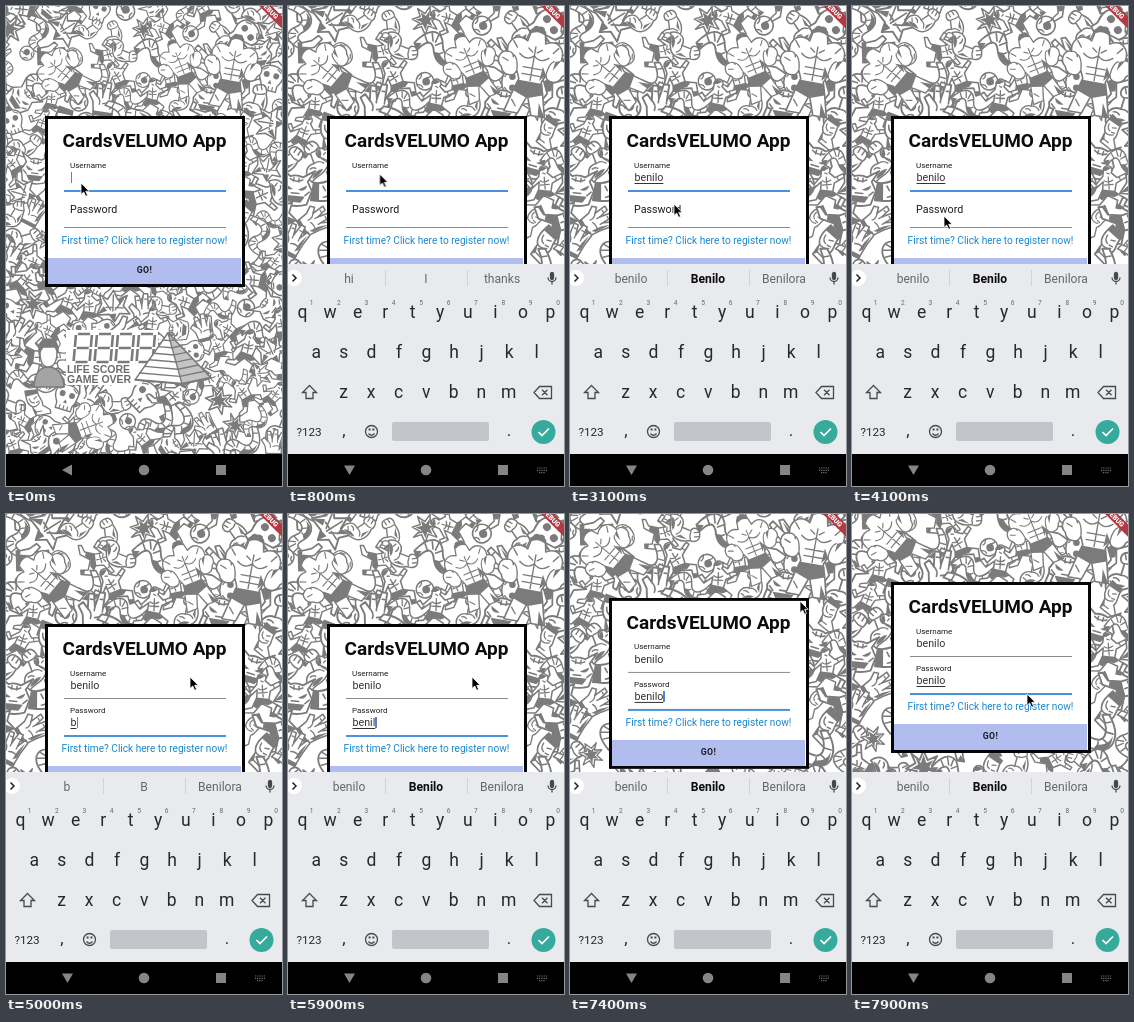
Animation of 276 by 480 pixels, one loop 8000 ms. Source, as an HTML page:

```html
<!DOCTYPE html>
<html lang="en">
<head>
<meta charset="utf-8">
<title>Login</title>
<style>
html, body { margin: 0; width: 100%; height: 100%; overflow: hidden; background: #fff; }
body { position: relative; font-family: Roboto, Arial, sans-serif; color: #1d1d1d; }
#stage, #page, #art, #banner, #keys, #nav, #mouse { position: absolute; left: 0; top: 0; }
#stage { width: 276px; height: 480px; overflow: hidden; background: #fff; }
#page { width: 276px; height: 480px; animation: scroll 8s linear infinite; }
#art { overflow: visible; transform-origin: 138px 68px; animation: cover 8s step-end infinite; }
#page div { position: absolute; white-space: pre; line-height: 14px; }
#page .card { box-sizing: border-box; left: 39px; top: 110px; width: 199.5px; height: 171px; border: 3px solid #060608; background: #fff; }
#page .title { left: 39px; width: 199px; top: 123px; font: 700 19px/24px Roboto, Arial, sans-serif; color: #0c0c0e; text-align: center; }
#page .label { left: 64px; font-size: 10.7px; transform-origin: 0 0; }
#page .user { top: 154px; transform: scale(.75); }
#page .pass { top: 196.7px; animation: float 8s ease-out infinite; }
#page .field { left: 64.5px; font-size: 10.7px; color: #333; }
.field span { text-underline-offset: 1.5px; text-decoration-skip-ink: none; }
.focus span { text-decoration: underline 1px; }
.field i { display: inline-block; width: 1.3px; height: 11px; margin-right: -2px; vertical-align: -2px; background: #4a86d8; visibility: hidden; }
#page .line { left: 58px; width: 162px; height: 1px; background: #8b8b8b; }
#page .line.focus { height: 2px; background: #4792da; }
#page .link { left: 39px; width: 199px; top: 228px; font-size: 10.1px; text-align: center; color: #1b87cf; }
#page .go { left: 42px; width: 193px; top: 252px; height: 26px; background: #b0bdee; font-weight: 700; font-size: 8.7px; line-height: 25px; letter-spacing: .4px; text-align: center; }
#keys { top: 258px; animation: rise 8s ease-out infinite; }
#keys text { text-anchor: middle; fill: #26282b; }
#keys .soft { fill: #63676c; }
#keys .bold { fill: #0c0c0e; font-weight: 700; }
#nav { top: 448px; }
#mouse { overflow: visible; animation: mouse 8s linear infinite; }
@keyframes cover { 0% { transform: none; } 2.5%, 100% { transform: scale(1.2); } }
@keyframes rise { 0%, 1.25% { transform: translateY(191px); } 5.6%, 100% { transform: none; } }
@keyframes float { 0%, 53.75% { transform: none; } 56.25%, 100% { transform: translateY(-5.5px) scale(.75); } }
@keyframes scroll {
  0%, 88.1% { transform: none; }
  88.75% { transform: translateY(-2px); }
  95%, 100% { transform: translateY(-42px); }
}
@keyframes mouse {
  0%, 7.5% { transform: translate(75px, 177px); }
  17.5%, 18.75% { transform: translate(141px, 141px); }
  24% { transform: translate(150px, 130px); }
  31% { transform: translate(150px, 132px); }
  38.75% { transform: translate(104px, 198px); }
  41.25%, 55% { transform: translate(92px, 210px); }
  61%, 75% { transform: translate(184px, 163px); }
  84%, 87.5% { transform: translate(231px, 117px); }
  88.75% { transform: translate(230px, 110px); }
  95% { transform: translate(230px, 72px); }
  98.5%, 100% { transform: translate(175px, 180px); }
}
</style>
</head>
<body>
<div id="stage">
  <div id="page">
    <svg id="art" width="276" height="448" fill="#fff" stroke="#7b7b7b" stroke-width="1.4" stroke-linejoin="round" stroke-linecap="round"></svg>
    <div class="card"></div>
    <div class="title">CardsVELUMO App</div>
    <div class="label user">Username</div>
    <div class="field" id="user" style="top:165.3px"><span></span><i></i></div>
    <div class="line" id="userLine" style="top:184px"></div>
    <div class="label pass">Password</div>
    <div class="field" id="pass" style="top:202px"><span></span><i></i></div>
    <div class="line" id="passLine" style="top:221px"></div>
    <div class="link">First time? Click here to register now!</div>
    <div class="go">GO!</div>
  </div>
  <svg id="banner" width="276" height="40">
    <g transform="translate(263.5 4) rotate(45)">
      <path d="M-40-4.5H40V4.5H-40Z" fill="#b23a42"/>
      <text y="2.4" font-size="6.8" font-weight="900" fill="#fff" text-anchor="middle">DEBUG</text>
    </g>
  </svg>
  <svg id="keys" width="276" height="190">
    <path d="M0 0H276V190H0Z" fill="#e8eaee"/>
    <path d="M97.5 6V22M179.5 6V22" stroke="#cfd2d6"/>
    <circle cx="6" cy="14" r="8" fill="#fff"/>
    <path d="M4.5 10.5L8 14L4.5 17.5" fill="none" stroke="#222" stroke-width="1.5"/>
    <g fill="none" stroke="#46494d" stroke-width="1.3">
      <rect x="262.5" y="8.5" width="3" height="7" rx="1.5" fill="#46494d"/>
      <path d="M260 13.5a4 4 0 0 0 8 0M264 17.5V20.5"/>
      <path d="M21.5 121.5L28.5 128.5H25V134.500H18V128.5H14.500Z"/>
      <path d="M251.5 122.5H263.5V134.500H251.5L246 128.5ZM254 125.7L259.5 131.200M259.5 125.7L254 131.200"/>
      <circle cx="83.5" cy="167.5" r="6"/>
      <path d="M80.5 169.5q3 3.5 6 0"/>
    </g>
    <path d="M80.6 165.5h2M84.4 165.5h2" stroke="#46494d" stroke-width="1.8"/>
    <rect x="104" y="158" width="97" height="19" rx="2" fill="#c2c5c9"/>
    <circle cx="255.5" cy="168" r="12" fill="#36aa9b"/>
    <path d="M250.5 168L254 171.5L261 164.5" fill="none" stroke="#fff" stroke-width="1.7"/>
  </svg>
  <svg id="nav" width="276" height="32">
    <path d="M0 0H276V32H0Z" fill="#000"/>
    <g fill="#858585">
      <path id="back" d="M56 16L66 10.5V21.5Z"/>
      <circle cx="138" cy="16" r="5.3"/>
      <path d="M210 11H220V21H210Z"/>
    </g>
    <path id="imeIcon" d="M249 14H259M249 16.3H259M251 18.6H257" stroke="#707070" stroke-width="1.2" stroke-dasharray="1.2 1"/>
  </svg>
  <svg id="mouse" width="10" height="15"><path d="M0 0V11.5L2.7 9L4.7 13.3L6.6 12.4L4.7 8.3H8.2Z" fill="#000" stroke="#fff" stroke-width=".8"/></svg>
</div>
<script>
const $ = id => document.getElementById(id);
const NS = 'http://www.w3.org/2000/svg';
const INK = '#7b7b7b';

function add(parent, tag, attrs, text) {
  const el = document.createElementNS(NS, tag);
  for (const k in attrs) el.setAttribute(k, attrs[k]);
  if (text) el.textContent = text;
  return parent.appendChild(el);
}

// Doodles: [white outline, dark patches, inner lines]
const skull = ['M-12-3C-12-16 12-16 12-3C12 4 8 5 8 8V13H-8V8C-8 5-12 4-12-3Z',
  'M-8-3a3 3 0 1 0 6 0a3 3 0 1 0-6 0M2-3a3 3 0 1 0 6 0a3 3 0 1 0-6 0M0 2l2 4h-4Z', 'M-4 9v4M0 9v4M4 9v4M-9-7l4-3M9-7l-4-3'];
const eye = ['M-8 0a8 8 0 1 0 16 0a8 8 0 1 0-16 0Z',
  'M-3-1a3.5 3.5 0 1 0 7 0a3.5 3.5 0 1 0-7 0', 'M-8 2q4 0 5 3M-4-6q2 1 1 4M2 7q0-3 3-4'];
const arm = ['M-15 12C-16 2-8-2-2 2L2-6C-2-8 0-15 6-14C13-14 13-8 11-4C12 4 8 13 0 13C-6 14-10 10-15 12Z',
  'M-13 10Q-6 6 0 11Q-6 13-13 10M10-2L6 9L5 4Z', 'M-2 2Q3 3 4 8M3-6Q7-4 10-5M4-13v4M8-13v4M-8 3q3 0 4 3M-11 5l2 3'];
const demon = ['M-11 13L-13 2L-9-5L-14-14L-5-8Q0-10 5-8L14-14L9-5L13 2L10 13Q0 17-11 13Z',
  'M-9-2l7 4q-6 2-7-4M9-2l-7 4q6 2 7-4M-8 7H8L5 12H-5Z', 'M-3 5h6M-5-6q5 3 10 0M-11 3l3 3M11 3l-3 3M-2-7v3M2-7v3'];
const tail = ['M-20 6C-14-12-4-10 0-1C4 7 12 6 16-10L20-7C18 12 4 18-4 6C-8-1-12-1-16 10Z',
  'M-20 6L-16 10L-15 4ZM-4 6Q4 17 13 7Q6 11 0 5Z', 'M-15-2l4 4M-11-6l3 5M-6-7l0 6M-1-3l-4 4M2 4l-4 4M6 5l1 6M11 2l3 4M14-4l4 2'];
const runner = ['M-3-17a4 4 0 1 1 7 2L9-10L17-13L18-10L8-5L6 3L14 9L10 19L6 18L8 11L-1 6L-9 14L-18 13L-17 10L-10 9L-5 0L-4-7L-12-1L-17-7L-14-9L-11-5L-4-12Z',
  'M-5 0L6 2L10 6L5 8L-1 6L-6 10L-9 8ZM-4-17a4.500 4.500 0 0 1 8-2l-4 2ZM10 19L6 18L7 14L11 16Z', 'M-3-8q4 3 8 0M-3-4h8M1-11V0M-10-4l-2 2M11-10l1 2M0-15l2 1'];
const hand = ['M-8 14L-10 3L-14-3L-11-6L-7-2L-8-13H-4L-2-4L0-15H4L4-4L8-12L11-10L9 1L8 14Z',
  'M-9 11H9V15H-9ZM9-9L8 6L5 9L6 0Z', 'M-7-2q4 3 3 7M-2-4v3M4-4v3M-1 4q4-2 8 0M-6-9h2M1-10h2'];
const boot = ['M-9-14L4-13C3-4 9-2 7 4L14 10V14H-2L-4 4C-10 0-9-8-9-14Z',
  'M-9-14L4-13L4-9L-9-8ZM-2 14L-4 4L0 10Z', 'M-4 4q5 1 8-3M0 10h5M-6-5q1 5 5 5M2-6l-3 2M4-1l-3 1'];
const burst = ['M0-12L3-5L10-8L6-1L13 3L5 4L6 12L0 6L-7 11L-5 3L-13 1L-6-3L-9-10L-3-5Z',
  'M0-9L2-3L7-5L4 0L9 3L3 3L3 8L0 4L-5 7L-3 2L-9 1L-4-2L-6-7L-2-3Z', ''];
const frill = ['M-14 8L-10-2L-12-10L-5-6L0-14L4-6L12-10L9-1L15 6L6 6L2 13L-3 7Z',
  'M-14 8L-8 0L-5 4ZM4-6L9-8L6-1ZM-3 7L2 13L3 6Z', 'M0-10V4M-9-7L-2 3M9-7L2 3M-6 1h5M2 1h7'];
const doodles = [runner, tail, arm, runner, hand, frill, boot, demon, runner, tail, burst, eye, arm, skull];
const hero = [
  'M-8-26C-18-32-26-24-24-14C-31-14-33-4-27 0C-25 8-14 8-13 1L-10 8L-13 18L-18 38H-6L0 21L6 38H18L13 18L10 8L13 1C14 8 25 8 27 0C33-4 31-14 24-14C26-24 18-32 8-26L6-36Q0-42-6-36Z',
  'M-11 9H11L13 19L2 23L-2 23L-13 19ZM-6-33Q-6-42 0-40Q6-42 6-33Q0-37-6-33ZM13 1L8 7L9-6ZM24-14L18-4L19-12ZM18 38L11 26L12 38Z',
  'M0-22V8M-13 0Q-14-10-18-12M13 0Q14-10 18-12M-13-14Q-6-8 0-14Q6-8 13-14M-8-3H8M-8 3H8M-24-14Q-19-15-18-10M-13 27l4 5M-20-24l4 5M20-24l-4 5M-27-8l5 2M-6-20l4 3M6-20l-4 3'
];

function stamp([shape, dark, lines], x, y, size, turn) {
  const g = add($('art'), 'g', { transform: `translate(${x} ${y}) rotate(${turn}) scale(${size})` });
  add(g, 'path', { d: shape });
  add(g, 'path', { d: dark, fill: INK, stroke: 'none' });
  add(g, 'path', { d: lines, fill: 'none', 'stroke-width': 1.2 });
}

function drawArt() {
  let seed = 41;
  const rnd = () => (seed = (seed * 16807) % 2147483647) / 2147483647;
  for (let y = -20, row = 0; y < 470; y += 23, row++)
    for (let x = row % 2 ? -8 : 5; x < 292; x += 26)
      stamp(doodles[Math.floor(rnd() * doodles.length)], x + rnd() * 8 - 4, y + rnd() * 8 - 4, .8 + rnd() * .35, rnd() * 180 - 90);
  stamp(hero, 226, 66, .95, 10);
  stamp(hero, 176, 62, .75, -22);
  stamp(hero, 58, 68, .8, -50);
  stamp(hero, 80, 422, .8, 70);

  const art = $('art');
  add(art, 'path', { d: 'M60 324H152V366L131 379H60Z', stroke: 'none' });
  const seg = 'M2 0H14M0 1V13M16 1V13M2 14H14M0 15V27M16 15V27M2 28H14';
  for (let i = 0; i < 4; i++)
    add(art, 'path', { d: seg, transform: `translate(${70 + i * 21} 328) skewX(-5)`, 'stroke-width': 2.6, 'stroke-linecap': 'butt' });
  const label = { x: 61, fill: '#6c6c6c', stroke: 'none', 'font-family': 'Liberation Sans, Arial, sans-serif', 'font-size': 10.5, 'font-weight': 700 };
  add(art, 'text', { ...label, y: 367 }, 'LIFE SCORE');
  add(art, 'text', { ...label, y: 377 }, 'GAME OVER');
  add(art, 'path', { d: 'M129 374L162 327L205 372L176 378Z' });
  add(art, 'path', { d: 'M162 327L205 372L176 378Z', fill: '#c4c4c4' });
  for (let k = .15; k < 1; k += .14)
    add(art, 'path', { d: `M${162 - 33 * k} ${327 + 47 * k}L${162 + 14 * k} ${327 + 51 * k}L${162 + 43 * k} ${327 + 45 * k}`, fill: 'none' });
  add(art, 'path', { d: 'M28 381Q29 361 42 361Q56 361 58 381Z', fill: '#a4a4a4' });
  add(art, 'path', { d: 'M34 345Q34 335 42 335Q51 335 51 345Q51 361 42 361Q34 361 34 345Z' });
  add(art, 'path', { d: 'M33 347Q32 333 42 333Q53 333 52 347L49 341H37Z', fill: INK });
}

const key = (x, y, size, s, cls = '') => add($('keys'), 'text', { x, y, 'font-size': size, class: cls }, s);

function drawKeys() {
  [['qwertyuiop', 14.5, 53.5], ['asdfghjkl', 28.3, 93.5], ['zxcvbnm', 55.5, 133.5]].forEach(([row, x, y]) =>
    [...row].forEach((c, i) => key(x + i * 27.55, y, 17.5, c)));
  [...'1234567890'].forEach((c, i) => key(23.5 + i * 27.4, 40.5, 6.6, c, 'soft'));
  key(21, 171.5, 11.7, '?123');
  key(56, 171.5, 17, ',');
  key(221, 171.5, 17, '.');
}

drawArt();
drawKeys();
const hints = [61, 138, 214].map(x => key(x, 18.5, 12.1, '', 'soft'));

const word = 'benilo', cap = s => s[0].toUpperCase() + s.slice(1);
const userTimes = [1590, 1750, 1910, 2070, 2230, 2390];
const passTimes = [4990, 5190, 5390, 5590, 5790, 6300];
const focusAt = 4300;

function drawField(id, times, active, start, t) {
  const n = times.filter(at => at <= t).length;
  const last = n ? times[n - 1] : start;
  const [text, caret] = $(id).children;
  text.textContent = word.slice(0, n);
  $(id).classList.toggle('focus', active);
  $(id + 'Line').classList.toggle('focus', active);
  caret.style.visibility = active && (t - last) % 1000 < 500 ? 'visible' : 'hidden';
  return n;
}

function draw() {
  const t = performance.now() % 8000;
  const onPass = t >= focusAt;
  const a = drawField('user', userTimes, !onPass, -100, t);
  const b = drawField('pass', passTimes, onPass, focusAt, t);
  const n = onPass ? b : a;
  const typed = n > 3 ? word : word.slice(0, n);
  const list = n ? [typed, cap(typed), 'Benilora'] : ['hi', 'I', 'thanks'];
  hints.forEach((h, i) => h.textContent = list[i]);
  hints[1].classList.toggle('bold', n > 2);

  const open = t >= 200;
  $('back').setAttribute('d', open ? 'M56 11.5H67L61.5 21Z' : 'M56 16L66 10.5V21.5Z');
  $('imeIcon').style.display = open ? '' : 'none';
  requestAnimationFrame(draw);
}
draw();
</script>
</body>
</html>
```
